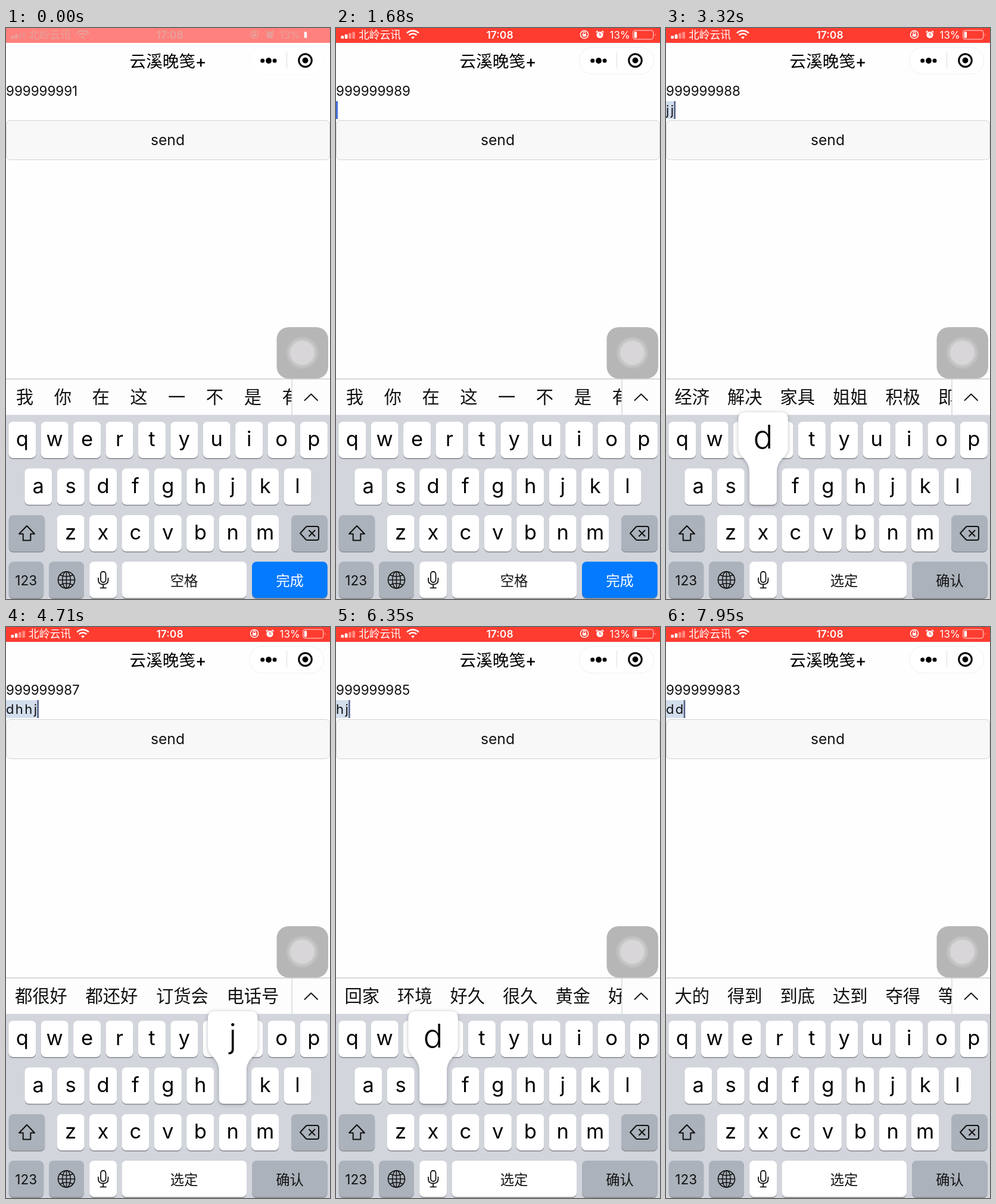
These frames come from a looping animation (544x960 px, 8000 ms). An HTML page with a canvas:

```html
<!DOCTYPE html>
<html lang="zh">
<head>
<meta charset="utf-8">
<style>
html, body { margin: 0; width: 100%; height: 100%; overflow: hidden; background: #fff; }
canvas { display: block; width: 544px; height: 960px; }
</style>
</head>
<body>
<canvas id="stage" width="544" height="960"></canvas>
<script>
const c = document.getElementById('stage').getContext('2d');
const LOOP = 8000;
const FONT = 'Inter, "Noto Sans CJK SC", "Noto Sans CJK", sans-serif';
const INK = '#111', GREY_KEY = '#abb2bb';

const ticks = [530, 1610, 2600, 3710, 4910, 5690, 6680, 7670];

// start, composed text, pressed key
const states = [
  [0, '', ''],
  [3060, '', 'j'], [3190, 'j', 'j'], [3320, 'jj', 'd'], [3450, 'jjd', 'd'], [3580, 'jjd', ''],
  [3710, '', ''],
  [3910, 'd', 'h'], [4310, 'dh', 'h'], [4510, 'dhh', 'j'], [4710, 'dhhj', 'j'],
  [4910, 'j', 'd'], [5170, 'jd', 'h'], [5430, 'jdh', 'j'],
  [5690, 'h', 'h'], [6020, 'h', 'j'], [6350, 'hj', 'd'],
  [6680, '', ''], [7010, 'd', ''],
  [7670, '', ''], [7740, '', 'd'], [7810, 'd', ''], [7880, 'd', 'd'], [7950, 'dd', '']
];

const words = {
  '': '我 你 在 这 一 不 是 有',
  j: '就 家 及 将 级 经 加 叫',
  d: '的 都 到 大 点 对 等 第',
  h: '和 好 会 还 很 后 或 回',
  jj: '经济 解决 家具 姐姐 积极 即将',
  jjd: '就觉得 经济的 解决的 姐姐的',
  dh: '电话 对话 大会 都会 都好 等候',
  dhh: '电话号 都很好 都还好 订货会',
  dhhj: '都很好 都还好 订货会 电话号',
  jd: '觉得 角度 简单 见到 绝对 加点',
  jdh: '接电话 简单化 见到后 觉得好',
  hj: '回家 环境 好久 很久 黄金 好几',
  dd: '大的 得到 到底 达到 夺得 等等'
};

const rows = [
  { keys: 'qwertyuiop', x: 4.3, y: 662 },
  { keys: 'asdfghjkl', x: 31.3, y: 740.5 },
  { keys: 'zxcvbnm', x: 85.6, y: 819 }
];
const PITCH = 54.4, KEY_W = 46, KEY_H = 61;

function text(s, x, y, size, color = INK, align = 'center', weight = 400) {
  c.font = `${weight} ${size}px ${FONT}`;
  c.textAlign = align;
  c.fillStyle = color;
  c.fillText(s, x, y);
}

function box(x, y, w, h, color) {
  c.fillStyle = color;
  c.fillRect(x, y, w, h);
}

function round(x, y, w, h, r, fill, stroke, line = 1) {
  c.beginPath();
  c.roundRect(x, y, w, h, r);
  paint(fill, stroke, line);
}

function disc(x, y, r, fill, stroke, line) {
  c.beginPath();
  c.arc(x, y, r, 0, Math.PI * 2);
  paint(fill, stroke, line);
}

function paint(fill, stroke, line = 1) {
  if (fill) { c.fillStyle = fill; c.fill(); }
  if (stroke) { c.strokeStyle = stroke; c.lineWidth = line; c.stroke(); }
}

function path(d, stroke, line, fill) {
  c.lineJoin = c.lineCap = 'round';
  const p = new Path2D(d);
  if (fill) { c.fillStyle = fill; c.fill(p); }
  if (stroke) { c.strokeStyle = stroke; c.lineWidth = line; c.stroke(p); }
  c.lineCap = 'butt';
}

function mix(a, b, k) {
  return `rgb(${a.map((v, i) => Math.round(v + (b[i] - v) * k))})`;
}

function statusBar(k) {
  const ink = mix([229, 160, 156], [255, 255, 255], k);
  const dim = mix([240, 140, 136], [255, 140, 132], k);
  const red = mix([255, 129, 125], [254, 60, 48], k);
  box(0, 0, 544, 25, red);
  for (let i = 0; i < 4; i++) {
    const h = 5 + i * 2.2;
    round(8.5 + i * 6.3, 18 - h, 4.6, h, 1, i < 2 ? ink : dim);
  }
  text('北岭云讯', 38, 18, 17.8, ink, 'left');
  for (let r = 4; r < 15; r += 5) {
    c.beginPath();
    c.arc(129, 18.5, r, -Math.PI * 0.75, -Math.PI * 0.25);
    if (r === 4) { c.lineTo(129, 18.5); paint(ink); }
    else paint(null, ink, 2.7);
  }
  text('17:08', 275, 18, 17.5, ink, 'center', 600);
  disc(417, 11, 6.6, null, ink, 1.5);
  round(413.8, 10, 6.4, 4.6, 1, ink);
  path('M415 10V8.6a2 2 0 0 1 4 0V10', ink, 1.2);
  disc(443, 11.5, 5.6, ink);
  path('M437.3 6.8L439 5.4M448.7 6.8L447 5.4', ink, 2);
  path('M443 8.5V12H445.5', red, 1.2);
  text('13%', 459.5, 18, 17, ink, 'left');
  c.globalAlpha = k;
  round(498.7, 4.2, 34, 14.6, 3.5, null, '#ffc1bc', 1.3);
  path('M535.5 9.5q2 2 0 4z', null, 0, '#ffc1bc');
  c.globalAlpha = 1;
  round(500.7, 6.2, 4.4, 10.6, 1.3, '#fff');
}

function titleBar(k) {
  text('云溪晚笺+', 272, 66, 27.6, '#000', 'center', 500);
  c.globalAlpha = 0.35 + 0.65 * k;
  round(408.5, 32.5, 125, 45, 22.5, '#fff', '#f0f0f0');
  c.globalAlpha = 1;
  box(471, 40, 1, 28, '#dedede');
  disc(430.7, 55, 3.5, '#000');
  disc(441, 55, 4.9, '#000');
  disc(451, 55, 3.5, '#000');
  disc(502.5, 54.5, 10.8, null, '#000', 3);
  disc(502.5, 54.5, 4.9, '#000');
}

function caretAlpha(t) {
  if (t < 530) return 0;
  if (t < 670) return (t - 460) / 210;
  for (const [a, b] of [[1070, 1680], [2270, 2860]]) {
    if (t >= a && t < b) return Math.max(0, 1 - (t - a + 70) / 210, 1 - (b - t) / 210);
  }
  return 1;
}

function field(typed, t) {
  if (!typed) {
    c.globalAlpha = caretAlpha(t);
    box(0, 123, 3, 30, '#446fdb');
    c.globalAlpha = 1;
    return;
  }
  c.font = `400 22px ${FONT}`;
  const gap = 2.4;
  const widths = [...typed].map(ch => c.measureText(ch).width + gap);
  const end = widths.reduce((a, b) => a + b, 0);
  box(0, 123, end, 30, '#d3deed');
  let x = 0;
  [...typed].forEach((ch, i) => {
    text(ch, x, 146, 22, INK, 'left');
    x += widths[i];
  });
  box(end - 2, 123, 2.5, 30, '#505d85');
}

function assist() {
  round(454.5, 503, 86.5, 86.5, 20, '#b7b6b7');
  disc(497.5, 546, 27, '#bfbebf');
  disc(497.5, 546, 24, '#c8c7c8');
  disc(497.5, 546, 20.3, '#d8d6d8');
}

function candidates(typed) {
  box(0, 590, 544, 61, '#fdfdfe');
  box(0, 589.5, 544, 1.2, '#bfc0c3');
  c.save();
  c.beginPath();
  c.rect(0, 590, 479.5, 61);
  c.clip();
  let x = -0.4;
  for (const w of words[typed].split(' ')) {
    const cell = Math.max(63.8, w.length * 30 + 28.5);
    text(w, x + cell / 2, 631, 29.3);
    x += cell;
  }
  c.restore();
  box(479.5, 590, 1, 61, '#c6c7ca');
  path('M501.5 626L512.3 615.5L523 626', INK, 1.8);
}

function key(x, y, w, color = '#fff') {
  round(x, y + 1.7, w, KEY_H, 7.5, '#8f9297');
  round(x, y, w, KEY_H, 7.5, color);
}

function bubble(ch) {
  const row = rows.find(r => r.keys.includes(ch));
  const x = row.x + row.keys.indexOf(ch) * PITCH, y = row.y;
  const l = x - 18.7, r = x + KEY_W + 18.7, e = x + KEY_W, top = y - 94.5, end = y + KEY_H;
  const shape = `M${l + 12} ${top}H${r - 12}Q${r} ${top} ${r} ${top + 12}V${y - 36}`
    + `C${r} ${y - 18} ${e} ${y - 17} ${e} ${y + 6}V${end - 8}Q${e} ${end} ${e - 8} ${end}`
    + `H${x + 8}Q${x} ${end} ${x} ${end - 8}V${y + 6}C${x} ${y - 17} ${l} ${y - 18} ${l} ${y - 36}`
    + `V${top + 12}Q${l} ${top} ${l + 12} ${top}Z`;
  c.save();
  c.shadowColor = 'rgba(60,65,75,.36)';
  c.shadowBlur = 6;
  c.shadowOffsetY = 1;
  path(shape, null, 0, '#fff');
  c.restore();
  text(ch, x + KEY_W / 2, y - 33.5, 55, '#000', 'center', 300);
}

function icons() {
  path('M35 837L48 850.5H41.3V861.5H28.7V850.5H22Z', INK, 2);
  path('M494 849.5L503.5 839Q504.5 838 506 838H522Q525 838 525 841V858Q525 861 522 861H506Q504.5 861 503.5 860Z', INK, 2);
  path('M509 844.7L518.5 854.3M518.5 844.7L509 854.3', INK, 2);
  disc(101.5, 928, 14, null, INK, 1.6);
  c.beginPath();
  c.ellipse(101.5, 928, 6.8, 14, 0, 0, Math.PI * 2);
  paint(null, INK, 1.5);
  path('M101.5 914V942M87.5 928H115.5M90.5 919.5Q101.5 925 112.5 919.5M90.5 936.5Q101.5 931 112.5 936.5', INK, 1.5);
  round(159, 914, 8.5, 18, 4.2, null, INK, 1.8);
  path('M155 925V928Q155 935.5 163.2 935.5Q171.5 935.5 171.5 928V925M163.2 935.5V941M158.5 941.3H168', INK, 1.8);
}

function keyboard(typed, pressed) {
  box(0, 650.5, 544, 310, '#d2d5dc');
  for (const { keys, x, y } of rows) {
    [...keys].forEach((ch, i) => {
      const left = x + i * PITCH;
      key(left, y, KEY_W);
      text(ch, left + KEY_W / 2, y + 41, 34.5, '#000');
    });
  }
  key(4.7, 819, 60.5, GREY_KEY);
  key(479, 819, 60.7, GREY_KEY);
  key(4.7, 897.3, 58.5, GREY_KEY);
  key(72, 897.3, 59, GREY_KEY);
  key(140.2, 897.3, KEY_W);
  key(194.5, 897.3, 209.5);
  key(413, 897.3, 126.7, typed ? GREY_KEY : '#037aff');
  text('123', 33.7, 936.5, 22.5);
  text(typed ? '选定' : '空格', 299, 937.5, 23.3);
  text(typed ? '确认' : '完成', 476.5, 937.5, 23.3, typed ? INK : '#fff');
  icons();
  if (pressed) bubble(pressed);
}

function draw(t) {
  const [, typed, pressed] = states.findLast(s => s[0] <= t);
  const count = 999999991 - ticks.filter(x => x <= t).length;
  const k = t < 530 ? 0 : Math.min(1, (t - 460) / 210);
  box(0, 0, 544, 960, '#fefefe');
  statusBar(k);
  titleBar(k);
  text(String(count), 0, 114, 22.4, INK, 'left');
  field(typed, t);
  round(0.5, 155.5, 543, 66, 7, '#f9f8f9', '#d2d1d5');
  text('send', 271.5, 197, 24.7);
  assist();
  candidates(typed);
  keyboard(typed, pressed);
}

const start = performance.now();
function frame() {
  draw((performance.now() - start) % LOOP);
  requestAnimationFrame(frame);
}
frame();
</script>
</body>
</html>
```
